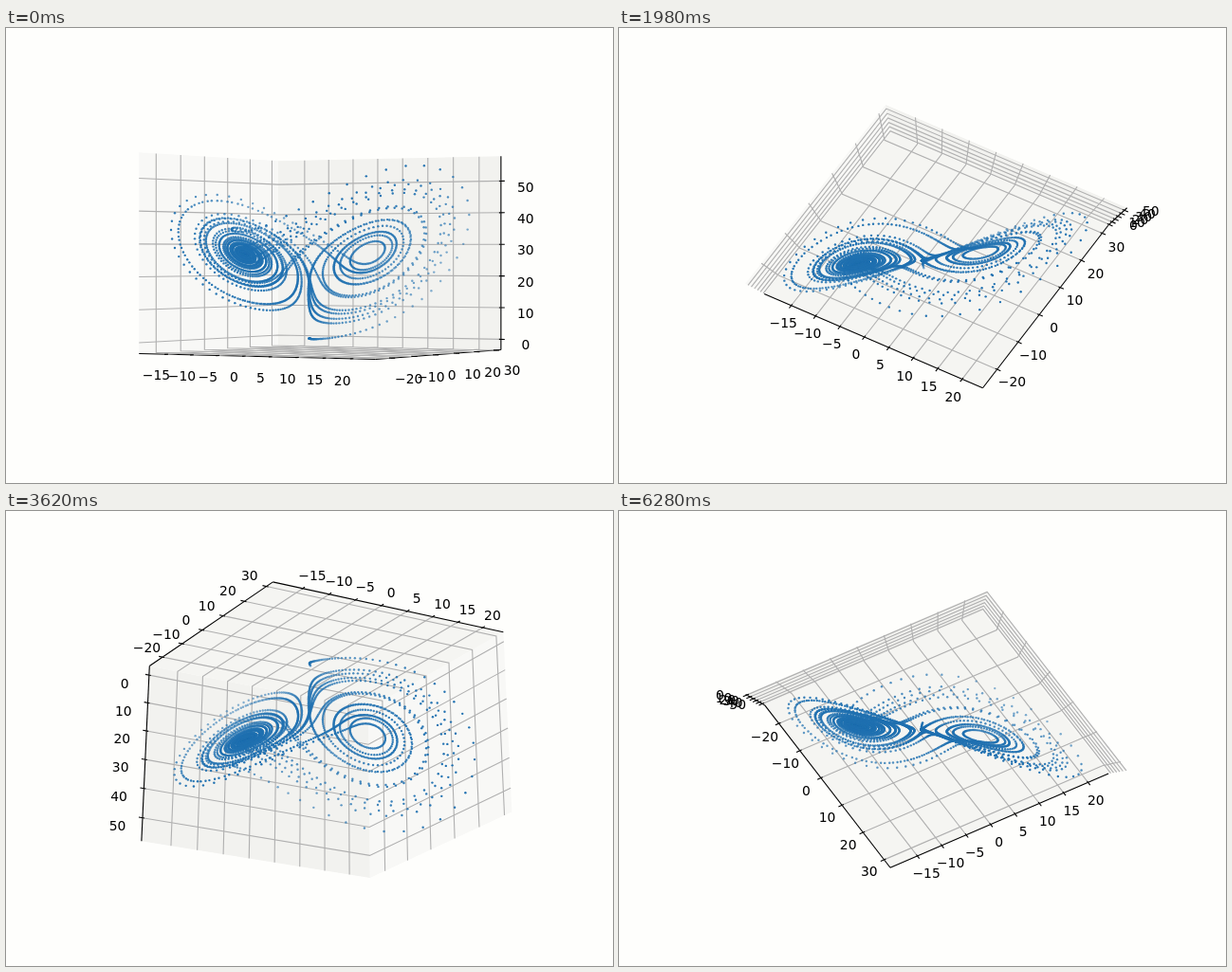
An HTML page with a canvas for the animation above (6380 ms loop, 640x480 px).

```html
<!DOCTYPE html>
<html lang="en">
<head>
<meta charset="utf-8">
<title>Tumbling Lorenz attractor</title>
<style>
  html, body { margin: 0; width: 100%; height: 100%; overflow: hidden; background: #fefefc; }
  canvas { display: block; }
</style>
</head>
<body>
<canvas id="stage" width="640" height="480"></canvas>
<script>
const ctx = document.getElementById('stage').getContext('2d');
const LOOP = 6380, LAST_STEP = 134, DEGREES_PER_STEP = 2;
const DISTANCE = 10, AZIMUTH = -Math.PI / 3;
const CENTER = [334.7, 237.4], SCALE = [268.1, 199.8];
const EDGE = 0.5 + 1 / 48, DELTA = 1 / 12, LABEL_GAP = 0.0738;

// flip / tick: the axis across which the line is moved, and along which ticks point
const axes = [
  { min: -19.65, max: 23.3, from: -15, to: 20, step: 5, flip: 1, tick: 1, pane: '#f8f8f6' },
  { min: -25.6, max: 31.7, from: -20, to: 30, step: 10, flip: 0, tick: 0, pane: '#f2f2ef' },
  { min: -2.1, max: 56.6, from: 0, to: 50, step: 10, flip: 0, tick: 0, pane: '#f5f5f2' }
];

const normalize = (value, i) => (value - axes[i].min) / (axes[i].max - axes[i].min) - 0.5;
const replace = (point, i, value) => point.map((v, j) => j === i ? value : v);
const flipped = (point, i) => replace(point, i, -point[i]);

function lorenzPoints(count, dt) {
  let x = 1, y = -1, z = 1;
  const points = [];
  for (let i = 0; i < count; i++) {
    points.push([x, y, z].map(normalize));
    const dx = 10 * (y - x);
    const dy = x * (28 - z) - y;
    const dz = x * y - 8 / 3 * z;
    x += dx * dt;
    y += dy * dt;
    z += dz * dt;
  }
  return points;
}

const points = lorenzPoints(3000, 0.01);
const cosA = Math.cos(AZIMUTH), sinA = Math.sin(AZIMUTH);
let cosE, sinE;

function project([x, y, z]) {
  const forward = x * cosA + y * sinA;
  const depth = forward * cosE + z * sinE;
  const zoom = DISTANCE / (DISTANCE - depth);
  return [
    CENTER[0] + (y * cosA - x * sinA) * zoom * SCALE[0],
    CENTER[1] - (z * cosE - forward * sinE) * zoom * SCALE[1],
    depth
  ];
}

function trace(corners) {
  ctx.beginPath();
  for (const corner of corners) {
    const [x, y] = project(corner);
    ctx.lineTo(x, y);
  }
}

function line(corners, color) {
  trace(corners);
  ctx.strokeStyle = color;
  ctx.stroke();
}

function drawPane(far, i) {
  const j = (i + 1) % 3, k = (i + 2) % 3;
  trace([far, flipped(far, j), flipped(flipped(far, j), k), flipped(far, k)]);
  ctx.fillStyle = axes[i].pane;
  ctx.fill();
}

function drawAxis(far, i) {
  const { from, to, step, flip, tick } = axes[i];
  const start = flipped(far, flip);
  const sign = Math.sign(far[tick]);
  line([start, flipped(start, i)], '#000');

  for (let value = from; value <= to; value += step) {
    const corner = replace(far, i, normalize(value, i));
    line([flipped(corner, (i + 1) % 3), corner, flipped(corner, (i + 2) % 3)], '#b0b0b0');
  }
  ctx.fillStyle = '#000';
  for (let value = from; value <= to; value += step) {
    const base = replace(start, i, normalize(value, i));
    line([0.1, -0.2].map(f => replace(base, tick, base[tick] + f * sign * DELTA)), '#000');
    const label = base.map((v, j) => j === i ? v : v + Math.sign(v) * LABEL_GAP);
    const [x, y] = project(label);
    ctx.fillText(String(value).replace('-', '\u2212'), x, y + 11);
  }
}

function drawPoints() {
  const dots = points.map(project);
  let near = -Infinity, farthest = Infinity;
  for (const [, , depth] of dots) {
    near = Math.max(near, depth);
    farthest = Math.min(farthest, depth);
  }
  ctx.fillStyle = '#1f70b0';
  for (const [x, y, depth] of dots) {
    // Face and outline overlap, so the fade counts twice
    const fade = 0.7 * (near - depth) / (near - farthest);
    ctx.globalAlpha = 1 - fade * fade;
    ctx.beginPath();
    ctx.arc(x, y, 1.2, 0, 2 * Math.PI);
    ctx.fill();
  }
  ctx.globalAlpha = 1;
}

function draw(step) {
  const elevation = step * DEGREES_PER_STEP * Math.PI / 180;
  cosE = Math.cos(elevation);
  sinE = Math.sin(elevation);

  ctx.fillStyle = '#fefefc';
  ctx.fillRect(0, 0, 640, 480);
  ctx.font = '13.89px "DejaVu Sans", sans-serif';
  ctx.textAlign = 'center';
  ctx.lineWidth = 1.11;

  // The corner of the box farthest from the camera
  const far = [cosA * cosE, sinA * cosE, sinE].map(v => v < -1e-9 ? EDGE : -EDGE);
  for (let i = 0; i < 3; i++) drawPane(far, i);
  for (let i = 0; i < 3; i++) drawAxis(far, i);
  drawPoints();
}

// Steps come in threes: two short holds of 20 ms, then one of 100 ms
function stepAt(time) {
  const shifted = time + 20;
  const rest = shifted % 140;
  const inGroup = rest < 20 ? 0 : rest < 40 ? 1 : 2;
  return Math.min(LAST_STEP, 3 * Math.floor(shifted / 140) + inGroup - 1);
}

let shown = -1;
const began = performance.now();
function tick() {
  const step = stepAt((performance.now() - began) % LOOP);
  if (step !== shown) draw(shown = step);
  requestAnimationFrame(tick);
}
tick();
</script>
</body>
</html>
```
